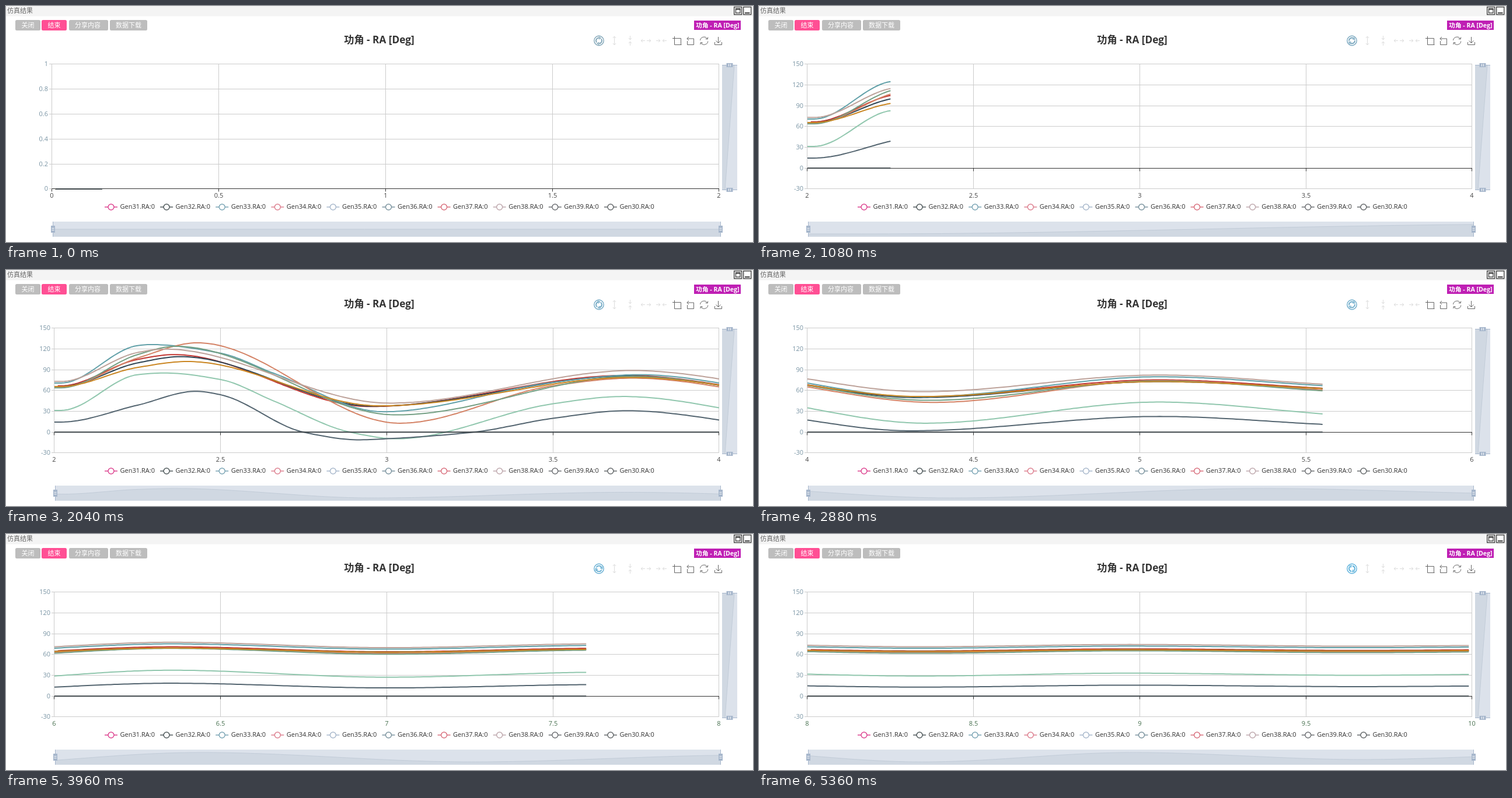
Write an HTML page that moves like this. It is 1280x405 px and loops after 5440 ms.

```html
<!DOCTYPE html>
<html lang="zh">
<head>
<meta charset="utf-8">
<title>仿真结果</title>
<style>
  html, body { margin: 0; width: 100%; height: 100%; overflow: hidden; background: #fff; }
  svg { display: block; width: 1280px; height: 405px; font: 11px 'Open Sans', 'Noto Sans CJK SC', 'Noto Sans CJK', sans-serif; }
  .line { fill: none; stroke-width: 2; stroke-linejoin: round; }
  .icon { fill: none; stroke: #666; }
  .pale { fill: none; stroke: #ddd; }
  .btn text { fill: #fff; text-anchor: middle; font-weight: 500; }
  .grip { fill: #a7b7cc; }
  .mid { text-anchor: middle; }
  #spin { transform-origin: 1016px 59.5px; }
</style>
</head>
<body>
<svg viewBox="0 0 1280 405">
  <rect width="1280" height="17.5" fill="#f4f4f4"/>
  <text x="2" y="11.5" fill="#666">仿真结果</text>
  <g fill="#fff" stroke="#444" stroke-width="1.4">
    <rect x="1247.7" y="1.7" width="13" height="13"/>
    <rect x="1263.7" y="1.7" width="13" height="13"/>
    <rect x="1250.5" y="4.5" width="7.5" height="7.5"/>
    <path d="M1250 5.5h8.5M1266 12h8.5" stroke-width="2"/>
  </g>
  <g class="btn" id="buttons"></g>
  <rect x="1179" y="25" width="80" height="16" fill="#bf1fb4"/>
  <text class="mid" x="1219.5" y="36.8" fill="#fff" font-size="10.6" font-weight="700">功角 - RA [Deg]</text>
  <text class="mid" x="639.5" y="63.5" fill="#333" font-size="17.2" font-weight="700">功角 - RA [Deg]</text>

  <g id="ring" fill="none" stroke-width="1.4">
    <circle cx="1016" cy="59.5" r="8.2"/>
    <g id="spin">
      <path d="M1012.2 62.5A4.8 4.8 0 0 1 1016.6 54.7M1019.8 56.5A4.8 4.8 0 0 1 1015.4 64.3" stroke-width="1.9"/>
      <path d="M1015.6 52.8l3.4 2.2-3.4 2M1016.4 62.2l-3.4 2 3.4 2.2" stroke-width="1.2"/>
    </g>
  </g>
  <g class="pale">
    <path d="M1042.5 53v13M1040 55l2.5-3 2.5 3M1040 64l2.5 3 2.5-3"/>
    <path d="M1069.5 51v6M1069.5 62v6M1067 55l2.5 3 2.5-3M1067 64l2.5-3 2.5 3"/>
    <path d="M1088 59.5h7M1098 59.5h7M1091 57l-3 2.5 3 2.5M1102 57l3 2.5-3 2.5"/>
    <path d="M1114 59.5h7M1125 59.5h7M1118 57l3 2.5-3 2.5M1128 57l-3 2.5 3 2.5"/>
  </g>
  <g class="icon">
    <path d="M1142 55.5h14.5v11M1145.5 52v14.5h12M1145.5 66.5"/>
    <path d="M1167.5 60v6.500h11v-10.500h-11.500M1170 53l-3.200 3 3.200 3"/>
    <path d="M1189.500 59a6.600 6.600 0 0 1 12.300-2.500M1202.800 60.500a6.600 6.600 0 0 1-12.300 2.500M1202.800 53.500l-.8 3.500-3.400-.8M1189.700 66l.8-3.500 3.400.8"/>
    <path d="M1214.500 62v4.500h12V62M1220.500 53v10M1216.500 59.500l4 4 4-4"/>
  </g>

  <g id="chart"></g>
  <g id="legend" fill="#333"></g>

  <rect x="1227" y="101" width="26" height="215" fill="#dce2eb"/>
  <path d="M1227 101h21L1232 316h-5z" fill="#d0d8e2"/>
  <path d="M1248 101L1232 316" stroke="#c2ccd8"/>
  <path d="M1227 101.500h26M1227 315.500h26" stroke="#a7b7cc"/>
  <path class="grip" d="M1234.500 98h11v7h-11zM1234.500 312h11v7h-11z"/>
  <path d="M1238.500 99.500v4M1241.500 99.500v4M1238.500 313.500v4M1241.500 313.500v4" stroke="#fff"/>
  <g id="slider"></g>
</svg>
<script>
const $ = id => document.getElementById(id);
const LOOP = 5440, STEP = 40, TOP = 100, BOTTOM = 314, RIGHT = 1222;

// Simulated seconds reached at given playback times
const PROGRESS = [[0, .15], [1080, 2.25], [2040, 4], [2880, 5.55], [3400, 6.55], [4480, 8.55], [5360, 10.05]];

// Late swings share their times and decay
const SWING_T = [5.057, 5.72, 6.35, 7, 7.66, 8.34, 8.97, 9.65, 10.3];
const SWING_A = [1, -.7, .5, -.34, .26, -.2, .15, -.11, .08];

// name, line colour, legend colour, rest angle, late amplitude, turning points after 2 s
const GENS = [
  ['Gen31', '#c23531', '#dd4591', 67, 8.5, [2.25, 105, 2.36, 112, 2.95, 37, 3.72, 82, 4.33, 51]],
  ['Gen32', '#2f4554', '#505a5c', 66, 7, [2.25, 100, 2.38, 109, 2.96, 37.5, 3.73, 81, 4.33, 50]],
  ['Gen33', '#61a0a8', '#7ba5b5', 71, 9, [2.25, 125, 2.29, 126.5, 2.5, 114, 2.66, 85, 2.99, 29.5, 3.5, 72, 3.76, 83, 4.335, 51]],
  ['Gen34', '#d48265', '#dd8090', 65, 9.5, [2.25, 107, 2.43, 129, 3.04, 13, 3.5, 67, 3.74, 78, 4.38, 43]],
  ['Gen35', '#91c7ae', '#a9b9cc', 31.5, 12, [2.25, 83, 2.33, 85.5, 2.5, 76, 2.66, 45, 2.89, 0, 3.03, -9.5, 3.5, 41, 3.71, 51.5, 4.355, 13]],
  ['Gen36', '#749f83', '#7d95a0', 64, 10, [2.25, 112, 2.365, 124, 3.03, 25, 3.74, 80.5, 4.365, 46]],
  ['Gen37', '#ca8622', '#d9707e', 66, 7, [2.25, 93.5, 2.4, 102, 2.98, 38, 3.74, 79, 4.34, 51.5]],
  ['Gen38', '#bda29a', '#bfa9ae', 73.2, 9.3, [2.25, 115, 2.33, 120, 3.01, 42, 3.74, 89, 4.345, 58.5]],
  ['Gen39', '#546570', '#6e7074', 14.7, 8, [2.25, 39, 2.425, 59, 2.5, 54, 2.75, 0, 2.917, -11, 3, -9.5, 3.26, 0, 3.5, 20, 3.72, 31, 4.31, 2]],
  ['Gen30', '#3c4448', '#666a6c', 0, 0, []]
];

// Monotone cubic through points, flat at turning points
function spline(p) {
  const d = p.slice(1).map((q, i) => (q[1] - p[i][1]) / (q[0] - p[i][0]));
  const m = p.map((_, i) => i && i < d.length && d[i - 1] * d[i] > 0 ? 2 * d[i - 1] * d[i] / (d[i - 1] + d[i]) : 0);
  return t => {
    let i = 0;
    while (i < d.length - 1 && t > p[i + 1][0]) i++;
    const h = p[i + 1][0] - p[i][0], u = (t - p[i][0]) / h, w = 1 - u;
    return p[i][1] * w * w * (1 + 2 * u) + p[i + 1][1] * u * u * (3 - 2 * u) + h * u * w * (m[i] * w - m[i + 1] * u);
  };
}

const DATA = GENS.map(([, , , rest, amp, turns]) => {
  const pts = [[0, 0], [.15, 0], [.4, rest], [2.02, rest]];
  for (let i = 0; i < turns.length; i += 2) pts.push([turns[i], turns[i + 1]]);
  SWING_T.forEach((t, i) => pts.push([t, rest + amp * SWING_A[i]]));
  const f = spline(pts);
  return Array.from({ length: 1001 }, (_, k) => f(k / 100));
});

function simTime(ms) {
  let i = 0;
  while (i < PROGRESS.length - 2 && ms > PROGRESS[i + 1][0]) i++;
  const [a, va] = PROGRESS[i], [b, vb] = PROGRESS[i + 1];
  const s = va + (vb - va) * (ms - a) / (b - a);
  return Math.min(9.99, Math.round(s * 20 + 1e-6) / 20);
}

// Rounded axis covering everything seen so far
function yAxis(end) {
  let lo = -.01, hi = 0;
  for (const row of DATA) for (let k = 0; k <= end; k++) {
    lo = Math.min(lo, row[k]);
    hi = Math.max(hi, row[k]);
  }
  if (hi < .001) { lo = 0; hi = 1; }
  const raw = (hi - lo) / 5, e = 10 ** Math.floor(Math.log10(raw)), f = raw / e;
  const gap = e * (f < 1.5 ? 1 : f < 2.5 ? 2 : f < 4 ? 3 : f < 7 ? 5 : 10);
  return { gap, first: Math.floor(lo / gap), last: Math.ceil(hi / gap) };
}

const px = v => Math.floor(v) + .5;
const path = (d, attrs) => `<path d="${d}" ${attrs}/>`;
const poly = pts => 'M' + pts.map(p => p[0].toFixed(1) + ' ' + p[1].toFixed(1)).join('L');

function drawChart(s) {
  const end = Math.round(s * 100);
  const base = Math.min(8, Math.max(0, Math.floor((end - 1) / 200) * 2));
  const { gap, first, last } = yAxis(end);
  const left = last * gap >= 100 ? 83 : gap < 1 ? 79 : 80;
  const X = t => left + (RIGHT - left) * (t - base) / 2;
  const Y = v => BOTTOM - (BOTTOM - TOP) * (v / gap - first) / (last - first);
  let grid = '', ticks = '', text = '';
  const zero = px(Y(0) - .1);
  for (let i = first; i <= last; i++) {
    const y = px(Y(i * gap) - .1);
    grid += `M${left - 5} ${y}H${RIGHT}`;
    text += `<text x="${left - 7}" y="${y + 3.3}" text-anchor="end" fill="#7893a3">${+(i * gap).toFixed(4)}</text>`;
  }
  for (let i = 0; i < 5; i++) {
    const t = base + i / 2, x = px(X(t) - .1);
    grid += `M${x} ${TOP}V${BOTTOM}`;
    ticks += `M${x} ${zero}v5`;
    text += `<text class="mid" x="${x}" y="328.500" fill="${base < 6 ? '#444' : '#47704f'}">${t}</text>`;
  }
  let out = path(grid, 'stroke="#ccc"') + path(`M${left} ${zero}H${RIGHT}${ticks}`, 'stroke="#333"') + text;
  DATA.forEach((row, i) => {
    const pts = [];
    for (let k = base * 100 + (i === 0 && base !== 4 || base === 0 ? 1 : 0); k <= end; k++) pts.push([X(k / 100), Y(row[k])]);
    if (pts.length > 1) out += path(poly(pts), `class="line" stroke="${GENS[i][1]}"`);
  });
  $('chart').innerHTML = out;
  drawSlider(left + 1.5, DATA[0].slice(base * 100, end + 1));
}

function drawSlider(x, row) {
  const lo = Math.min(...row), range = Math.max(...row) - lo, w = 1225 - x;
  const pts = row.map((v, i) => [x + w * i / (row.length - 1), range < .001 ? 383 : 391.1 - 16.2 * (v - lo) / range]);
  const curve = poly(pts);
  const grip = c => path(`M${c} 370V396`, 'stroke="#a7b7cc"') +
    `<rect class="grip" x="${c - 3.500}" y="377" width="7" height="12"/>` +
    path(`M${c - 2} 381.500h4M${c - 2} 384.500h4`, 'stroke="#fff"');
  $('slider').innerHTML = `<rect x="${x}" y="370" width="${w}" height="26" fill="#dce2eb"/>` +
    path(`${curve}L1225 396L${x} 396z`, 'fill="#d0d8e2"') +
    path(curve, 'fill="none" stroke="#c2ccd8"') + grip(x) + grip(1224.5);
}

$('buttons').innerHTML = [[16, 43, '关闭'], [61, 43, '结束'], [108, 67, '分享内容'], [178, 64, '数据下载']].map(([x, w, label], i) =>
  `<rect x="${x}" y="24" width="${w}" height="18" rx="2.500" fill="${i === 1 ? '#ff4f94' : '#bdbdbd'}"/>
   <text x="${x + w / 2 - (i === 2 ? 1.500 : 0)}" y="36.800">${label}</text>`).join('');

$('legend').innerHTML = GENS.map(([name, , color], i) => {
  const x = 169 + 95.1 * i;
  return `<path d="M${x} 345h22" stroke="${color}" stroke-width="1.500"/>
    <circle cx="${x + 11}" cy="345" r="5" fill="#fff" stroke="${color}" stroke-width="1.500"/>
    <text x="${x + 26.500}" y="348.300">${name}.RA:0</text>`;
}).join('');

const start = performance.now();
let shown = -1;
function tick() {
  const t = (performance.now() - start) % LOOP;
  const ms = Math.min(5360, Math.floor(t / STEP) * STEP);
  if (ms !== shown) {
    shown = ms;
    drawChart(simTime(ms));
    $('spin').style.transform = `rotate(${ms / 516 * 360}deg)`;
    $('ring').setAttribute('stroke', `hsl(200 ${28 + ms / 150}% 61%)`);
  }
  requestAnimationFrame(tick);
}
tick();
</script>
</body>
</html>
```
